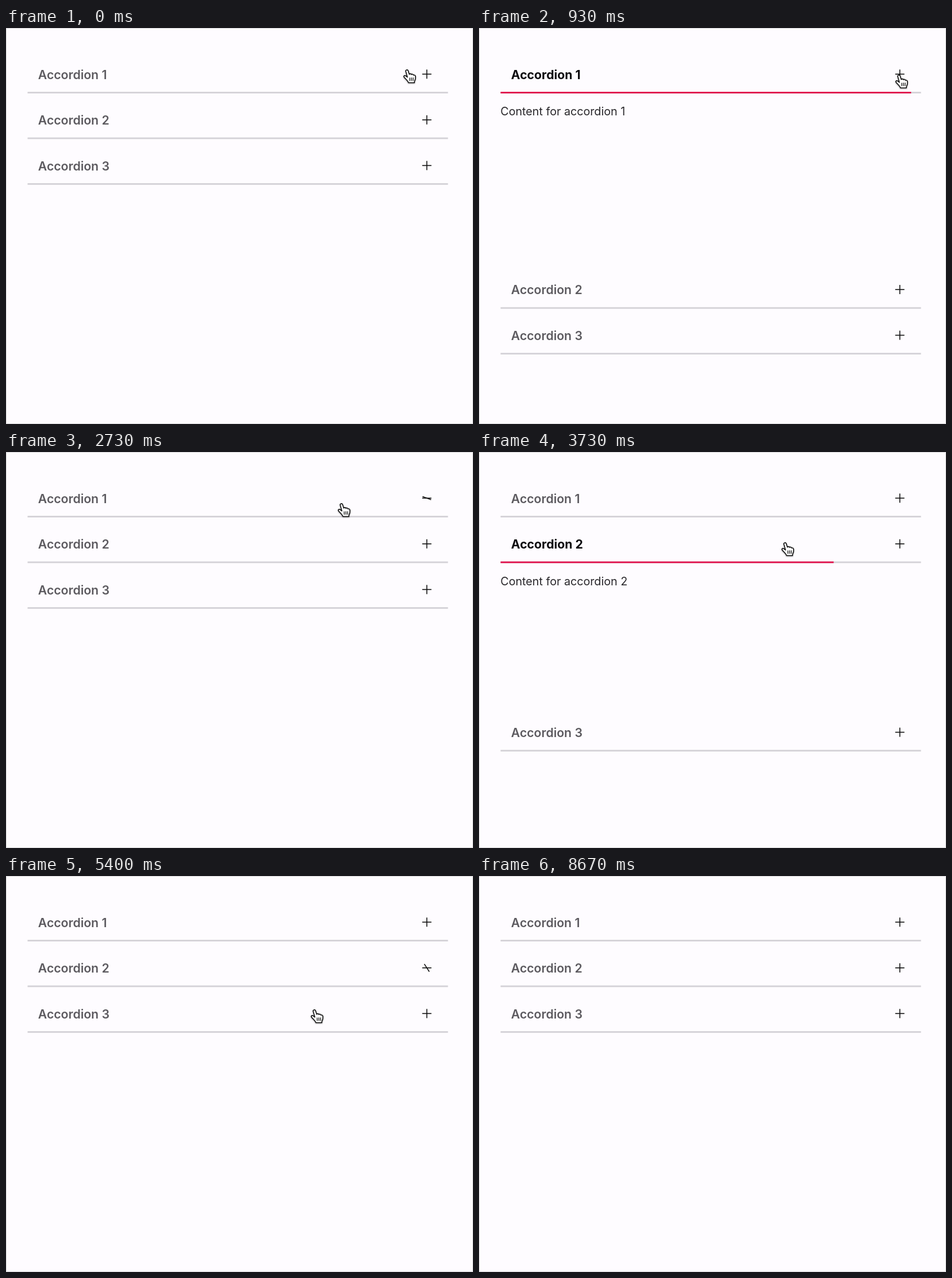
Animation of 812 by 689 pixels, one loop 10 s. Source, as an HTML page:

```html
<!DOCTYPE html>
<html lang="en">
<head>
<meta charset="utf-8">
<title>Accordion</title>
<style>
/* Per row: h = panel height, l = underline width, k = icon turn; all 0..1 */
@property --h1 { syntax: "<number>"; inherits: true; initial-value: 0 }
@property --h2 { syntax: "<number>"; inherits: true; initial-value: 0 }
@property --h3 { syntax: "<number>"; inherits: true; initial-value: 0 }
@property --l1 { syntax: "<number>"; inherits: true; initial-value: 0 }
@property --l2 { syntax: "<number>"; inherits: true; initial-value: 0 }
@property --l3 { syntax: "<number>"; inherits: true; initial-value: 0 }
@property --k1 { syntax: "<number>"; inherits: true; initial-value: 0 }
@property --k2 { syntax: "<number>"; inherits: true; initial-value: 0 }
@property --k3 { syntax: "<number>"; inherits: true; initial-value: 0 }

@keyframes h1 { 0%, 6.8% { --h1: 0 } 9.8%, 23.25% { --h1: 1 } 26.25%, 100% { --h1: 0 } }
@keyframes l1 { 0%, 6.9% { --l1: 0 } 9.9%, 23.25% { --l1: 1 } 26.25%, 100% { --l1: 0 } }
@keyframes k1 { 0%, 10.4% { --k1: 0 } 13.4%, 26.8% { --k1: 1 } 29.8%, 100% { --k1: 0 } }

@keyframes h2 { 0%, 35.73% { --h2: 0 } 38.73%, 49.35% { --h2: 1 } 52.35%, 100% { --h2: 0 } }
@keyframes l2 { 0%, 35.84% { --l2: 0 } 38.84%, 49.35% { --l2: 1 } 52.35%, 100% { --l2: 0 } }
@keyframes k2 { 0%, 39.33% { --k2: 0 } 42.33%, 52.9% { --k2: 1 } 55.9%, 100% { --k2: 0 } }

@keyframes h3 { 0%, 62.4% { --h3: 0 } 65.4%, 75.8% { --h3: 1 } 78.8%, 100% { --h3: 0 } }
@keyframes l3 { 0%, 62.5% { --l3: 0 } 65.5%, 75.8% { --l3: 1 } 78.8%, 100% { --l3: 0 } }
@keyframes k3 { 0%, 66% { --k3: 0 } 69%, 79.4% { --k3: 1 } 82.4%, 100% { --k3: 0 } }

@keyframes hand {
  0%, .5% { transform: translate(690px, 71px) }
  5.2%, 10% { transform: translate(723px, 80px) }
  13.8%, 19% { transform: translate(553px, 103px) }
  20%, 27.5% { transform: translate(576px, 88px) }
  33%, 37.3% { transform: translate(525px, 156px) }
  43.8%, 45% { transform: translate(523px, 161px) }
  48%, 49.7% { transform: translate(525px, 164px) }
  53.6%, 60% { transform: translate(529px, 231px) }
  62%, 100% { transform: translate(522px, 238px) }
}
@keyframes hand-shown { 0% { opacity: 1 } 85.2%, 100% { opacity: 0 } }
@keyframes arrow {
  0% { transform: translate(405px, 294px); opacity: 0 }
  85.2% { transform: translate(405px, 294px); opacity: 1 }
  85.9% { transform: translate(708px, 15px); opacity: 1 }
  86.6%, 100% { transform: translate(708px, 15px); opacity: 0 }
}

html, body { margin: 0; width: 100%; height: 100%; overflow: hidden; background: #fefcff }
#stage {
  display: block; width: 812px; height: 689px;
  font-family: Inter, sans-serif; font-optical-sizing: none;
  animation: h1 10s infinite, l1 10s infinite, k1 10s infinite,
             h2 10s infinite, l2 10s infinite, k2 10s infinite,
             h3 10s infinite, l3 10s infinite, k3 10s infinite;
}
.row { transform: translateY(var(--y)) }
#row1 { --h: var(--h1); --l: var(--l1); --k: var(--k1); --y: 0px }
#row2 { --h: var(--h2); --l: var(--l2); --k: var(--k2); --y: calc(79.5px + 300px * var(--h1)) }
#row3 { --h: var(--h3); --l: var(--l3); --k: var(--k3); --y: calc(159px + 300px * (var(--h1) + var(--h2))) }
.title {
  font-size: 21.2px; font-weight: calc(620 + 80 * var(--h));
  fill: color-mix(in srgb, #0c0b0e min(100%, 125% * var(--h)), #5c5a5f);
}
.rule { fill: #d4d2d7 }
.progress {
  width: calc(731px * var(--l));
  fill: color-mix(in srgb, #c3224c calc(100% * var(--k)), #e1124c);
}
.panel { height: calc(300px * var(--h)) }
.content { font-size: 19.7px; fill: #29272b }
.icon { stroke: #111; stroke-width: 1.6 }
.bar { transform: rotate(calc(90deg * (1 - var(--k)))) }
#hand { animation: hand 10s infinite ease-in-out, hand-shown 10s infinite step-end; filter: drop-shadow(0 1px 1px #0006) }
#arrow { animation: arrow 10s infinite step-end }
</style>
</head>
<body>
<svg id="stage" viewBox="0 0 812 689">
  <defs>
    <rect id="rule" class="rule" x="37.5" y="111" width="731" height="2.8"/>
    <path id="dash" d="M-8 0H8"/>
  </defs>
  <rect x=".5" y=".5" width="811" height="688" fill="#fefcff" stroke="#d6d4d8"/>

  <g class="row" id="row1">
    <clipPath id="panel1"><rect class="panel" y="114" width="812"/></clipPath>
    <text class="title" x="55.8" y="88.7">Accordion 1</text>
    <g class="icon" transform="translate(731.7 80.3)"><use href="#dash"/><use class="bar" href="#dash"/></g>
    <use href="#rule"/>
    <rect class="progress" x="37.5" y="111" height="2.8"/>
    <text class="content" x="37.3" y="152" clip-path="url(#panel1)">Content for accordion 1</text>
  </g>

  <g class="row" id="row2">
    <clipPath id="panel2"><rect class="panel" y="114" width="812"/></clipPath>
    <text class="title" x="55.8" y="88.7">Accordion 2</text>
    <g class="icon" transform="translate(731.7 80.3)"><use href="#dash"/><use class="bar" href="#dash"/></g>
    <use href="#rule"/>
    <rect class="progress" x="37.5" y="111" height="2.8"/>
    <text class="content" x="37.3" y="152" clip-path="url(#panel2)">Content for accordion 2</text>
  </g>

  <g class="row" id="row3">
    <clipPath id="panel3"><rect class="panel" y="114" width="812"/></clipPath>
    <text class="title" x="55.8" y="88.7">Accordion 3</text>
    <g class="icon" transform="translate(731.7 80.3)"><use href="#dash"/><use class="bar" href="#dash"/></g>
    <use href="#rule"/>
    <rect class="progress" x="37.5" y="111" height="2.8"/>
    <text class="content" x="37.3" y="152" clip-path="url(#panel3)">Contents for accordion 3</text>
  </g>

  <g id="hand" stroke="#111" stroke-width="1.6" stroke-linejoin="round" stroke-linecap="round">
    <path fill="#fff" d="M5.2 4.6C4.4 1.6 8.4 .8 9.3 3.6L11.2 9.6C12 8.2 14.6 8.3 15 10C16 9 18.2 9.3 18.5 11C20 10.4 21.8 11.3 21.9 13.2C22.2 16 22.2 18.5 20.5 21L20 24.3H10C8.5 20.5 5 18 2.2 14.5C.9 12.5 3 10.9 4.8 12.2L8 14.6Z"/>
    <path fill="none" stroke-width="1.3" d="M12 15.8L12.2 20.6M15 15.6L15.1 20.6M18 15.6L17.9 20.6"/>
  </g>
  <path id="arrow" fill="#111" stroke="#fff" stroke-width="1.2" d="M0 0V17L4 13.5L6.5 19.5L9 18.4L6.5 12.6H12Z"/>
</svg>
</body>
</html>
```
